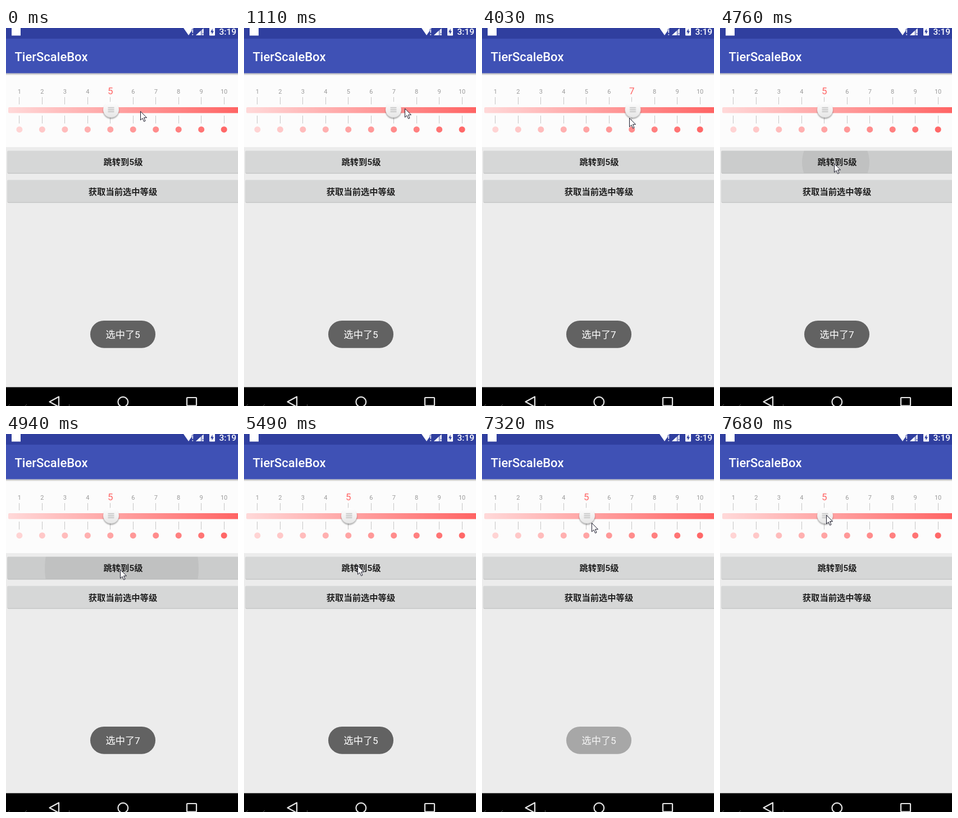
Write an HTML page that moves like this. It is 413 px wide and 673 px high and loops after 8000 ms.

```html
<!DOCTYPE html>
<html lang="zh-CN">
<head>
<meta charset="utf-8">
<title>TierScaleBox</title>
<style>
html, body { margin: 0; width: 100%; height: 100%; overflow: hidden; background: #ececec; }
svg { display: block; width: 413px; height: 673px; font-family: Roboto, "Noto Sans CJK SC", "Noto Sans CJK", sans-serif; }
.button { fill: #d6d7d7; }
.caption { font-size: 15.3px; font-weight: 700; fill: #212121; text-anchor: middle; }
.label { font-size: 11px; fill: #9a9a9a; text-anchor: middle; }
.toast text { font-size: 17.2px; fill: #fff; }

/* Every change is a hard cut; 1% is 80 ms. The small lead keeps cuts on time. */
.move { animation: 8s step-end -4ms infinite; }
#cursor { animation-name: cursor; }
#thumb { animation-name: thumb; }
#level5 { animation-name: level5; }
#level6 { animation-name: level6; }
#level7 { animation-name: level7; }
#toast { animation-name: toast; }
#pick5 { animation-name: pick5; }
#pick6 { animation-name: pick6; }
#pick7 { animation-name: pick7; }
#press { animation-name: press; }
#ripple { animation-name: ripple; }

@keyframes cursor {
  0% { transform: translate(239px, 148px); }
  9.25% { transform: translate(234px, 143px); }
  13.875% { transform: translate(286px, 143px); }
  16.125% { transform: translate(291px, 144px); }
  18.375% { transform: translate(284px, 143px); }
  20.625% { transform: translate(274px, 143px); }
  25.125% { transform: translate(273px, 143px); }
  27.375% { transform: translate(272px, 144px); }
  50.375% { transform: translate(262px, 160px); }
  52.625% { transform: translate(246px, 186px); }
  54.875% { transform: translate(224px, 220px); }
  57.125% { transform: translate(207px, 238px); }
  59.5% { transform: translate(203px, 241px); }
  64% { transform: translate(203px, 238px); }
  68.625% { transform: translate(202px, 234px); }
  82.375% { transform: translate(201px, 234px); }
  84.625% { transform: translate(201px, 226px); }
  86.875% { transform: translate(200px, 204px); }
  89.125% { transform: translate(198px, 178px); }
  91.5% { transform: translate(195px, 158px); }
  93.75% { transform: translate(193px, 147px); }
  96%, 100% { transform: translate(189px, 144px); }
}
@keyframes thumb {
  0%, 59.5%, 100% { transform: translate(187px, 145.5px); }
  2.25% { transform: translate(227.5px, 145.5px); }
  13.875% { transform: translate(266px, 145.5px); }
  16.125% { transform: translate(271px, 145.5px); }
  18.375% { transform: translate(268.5px, 145.5px); }
}
@keyframes level5 {
  0%, 59.5%, 100% { font-size: 17px; fill: #ff6464; transform: translateY(.8px); }
  2.25% { font-size: 11px; fill: #9a9a9a; transform: none; }
}
@keyframes level6 {
  0%, 13.875%, 100% { font-size: 11px; fill: #9a9a9a; transform: none; }
  2.25% { font-size: 17px; fill: #ff6464; transform: translateY(.8px); }
}
@keyframes level7 {
  0%, 59.5%, 100% { font-size: 11px; fill: #9a9a9a; transform: none; }
  18.375% { font-size: 17px; fill: #ff6464; transform: translateY(.8px); }
}
@keyframes toast {
  0%, 18.375% { opacity: 1; }
  16.125%, 91.5% { opacity: .5; }
  93.75%, 100% { opacity: 0; }
}
@keyframes pick5 {
  0%, 68.625%, 100% { opacity: 1; }
  16.125% { opacity: 0; }
}
@keyframes pick6 {
  0%, 41.25%, 100% { opacity: 0; }
  16.125% { opacity: 1; }
}
@keyframes pick7 {
  0%, 68.625%, 100% { opacity: 0; }
  41.25% { opacity: .7; }
  43.5% { opacity: 1; }
}
@keyframes press {
  0%, 68.625%, 100% { opacity: 0; }
  59.5% { opacity: 1; }
  66.25% { opacity: .4; }
}
@keyframes ripple {
  0%, 66.25%, 100% { r: 0; }
  59.5% { r: 60px; }
  61.75% { r: 137px; }
  64% { r: 215px; }
}
</style>
</head>
<body>
<svg viewBox="0 0 413 673">
  <defs>
    <linearGradient id="heat">
      <stop stop-color="#ffd9d9"/><stop offset="1" stop-color="#ff6464"/>
    </linearGradient>
    <linearGradient id="knob" x2="0" y2="1">
      <stop stop-color="#fff"/><stop offset="1" stop-color="#e6e6e6"/>
    </linearGradient>
    <linearGradient id="drop" x2="0" y2="1">
      <stop stop-color="#000" stop-opacity=".3"/><stop offset="1" stop-color="#000" stop-opacity="0"/>
    </linearGradient>
    <filter id="soft" x="-30%" y="-30%" width="160%" height="160%"><feGaussianBlur stdDeviation="1.3"/></filter>
    <clipPath id="pad"><rect x="2" y="218.5" width="412" height="39.7" rx="2"/></clipPath>
  </defs>

  <rect width="413" height="673" fill="#ececec"/>
  <rect y="80" width="413" height="132" fill="#fcfcfc"/>
  <rect y="80.5" width="413" height="4" fill="url(#drop)"/>
  <rect y="19" width="413" height="61.5" fill="#3f51b5"/>
  <rect width="413" height="19" fill="#303f9f"/>
  <text x="15.5" y="59" font-size="22" font-weight="500" fill="#fff">TierScaleBox</text>

  <!-- status icons -->
  <g fill="#fff">
    <rect x="10" width="16" height="13.5"/>
    <path d="M316 0H334L325 13Z"/>
    <path d="M331 2h2.4v7h-2.4zM331 10.5h2.4v2.5h-2.4z" stroke="#303f9f" stroke-width=".8"/>
    <path d="M338 13L352 0V13Z" opacity=".5"/>
    <path d="M338 13L346.5 5V13Z"/>
    <path d="M349.5 2h2v7h-2zM349.5 11h2v2h-2z"/>
    <rect x="362" y="-1" width="10" height="14.5" rx="1"/>
    <path d="M367.7 1L364 7.5H366.5V11.5L370 5.5H367.7Z" fill="#303f9f"/>
    <text x="379.5" y="12" font-size="15.5" font-weight="500">3:19</text>
  </g>

  <g id="scale"></g>
  <path d="M413 141H6a2 2 0 0 0-2 2v6.5a2 2 0 0 0 2 2H413Z" fill="url(#heat)"/>

  <g id="thumb" class="move">
    <circle cy="2.2" r="14" fill="#000" opacity=".36" filter="url(#soft)"/>
    <circle r="14" fill="url(#knob)"/>
    <path d="M-5.5 -3.5h11M-5.5 0h11M-5.5 3.5h11" stroke="#b9b9b9" stroke-width="1.4"/>
  </g>

  <g fill="#b9baba">
    <rect x="2.5" y="220" width="412" height="39.2" rx="2"/>
    <rect x="2.5" y="272" width="412" height="39.2" rx="2"/>
  </g>
  <rect class="button" x="2" y="218.5" width="412" height="39.7" rx="2"/>
  <rect class="button" x="2" y="270.5" width="412" height="39.7" rx="2"/>
  <g clip-path="url(#pad)">
    <g id="press" class="move">
      <rect x="2" y="218" width="412" height="42" opacity=".05"/>
      <circle id="ripple" class="move" cx="206" cy="239" opacity=".055"/>
    </g>
  </g>
  <text class="caption" x="208.5" y="244">跳转到5级</text>
  <text class="caption" x="208" y="296.5">获取当前选中等级</text>

  <g id="toast" class="toast move">
    <rect x="150" y="521" width="116" height="48.7" rx="24.3" fill="#626262"/>
    <text id="pick5" class="move" x="177.5" y="552">选中了5</text>
    <text id="pick6" class="move" x="177.5" y="552">选中了6</text>
    <text id="pick7" class="move" x="177.5" y="552">选中了7</text>
  </g>

  <!-- navigation bar -->
  <rect y="639.5" width="413" height="34" fill="#000"/>
  <g fill="none" stroke="#e4e4e4" stroke-width="2.2" stroke-linejoin="round">
    <path d="M77.5 665.5L94 656.5V674.5Z"/>
    <circle cx="208.3" cy="665.7" r="8.9"/>
    <rect x="322" y="658" width="17" height="14.5" rx="1"/>
  </g>
  <path d="M4 673l3-3M34 673l3-3M112.5 670v3" stroke="#555"/>

  <path id="cursor" class="move" d="M.5 .5V16L4 12.7L6.6 18.5L9 17.4L6.5 11.7H11.5Z" fill="#fff" stroke="#1c1c2c"/>
</svg>
<script>
const scale = document.getElementById('scale');

function add(tag, attrs, text = '') {
  const el = document.createElementNS('http://www.w3.org/2000/svg', tag);
  for (const key in attrs) el.setAttribute(key, attrs[key]);
  el.textContent = text;
  scale.append(el);
}

for (let level = 1; level <= 10; level++) {
  const x = 23.9 + 40.47 * (level - 1);
  const tone = 212 - 12 * (level - 1);
  const line = Math.floor(x) + 0.5;
  add('text', { id: 'level' + level, class: 'label move', x, y: 117 }, level);
  add('path', { d: `M${line} 123V136M${line} 156V170`, stroke: '#c6c6c6' });
  add('circle', { cx: x, cy: 180.7, r: 5.5, fill: `rgb(255,${tone},${tone})` });
}
</script>
</body>
</html>
```
